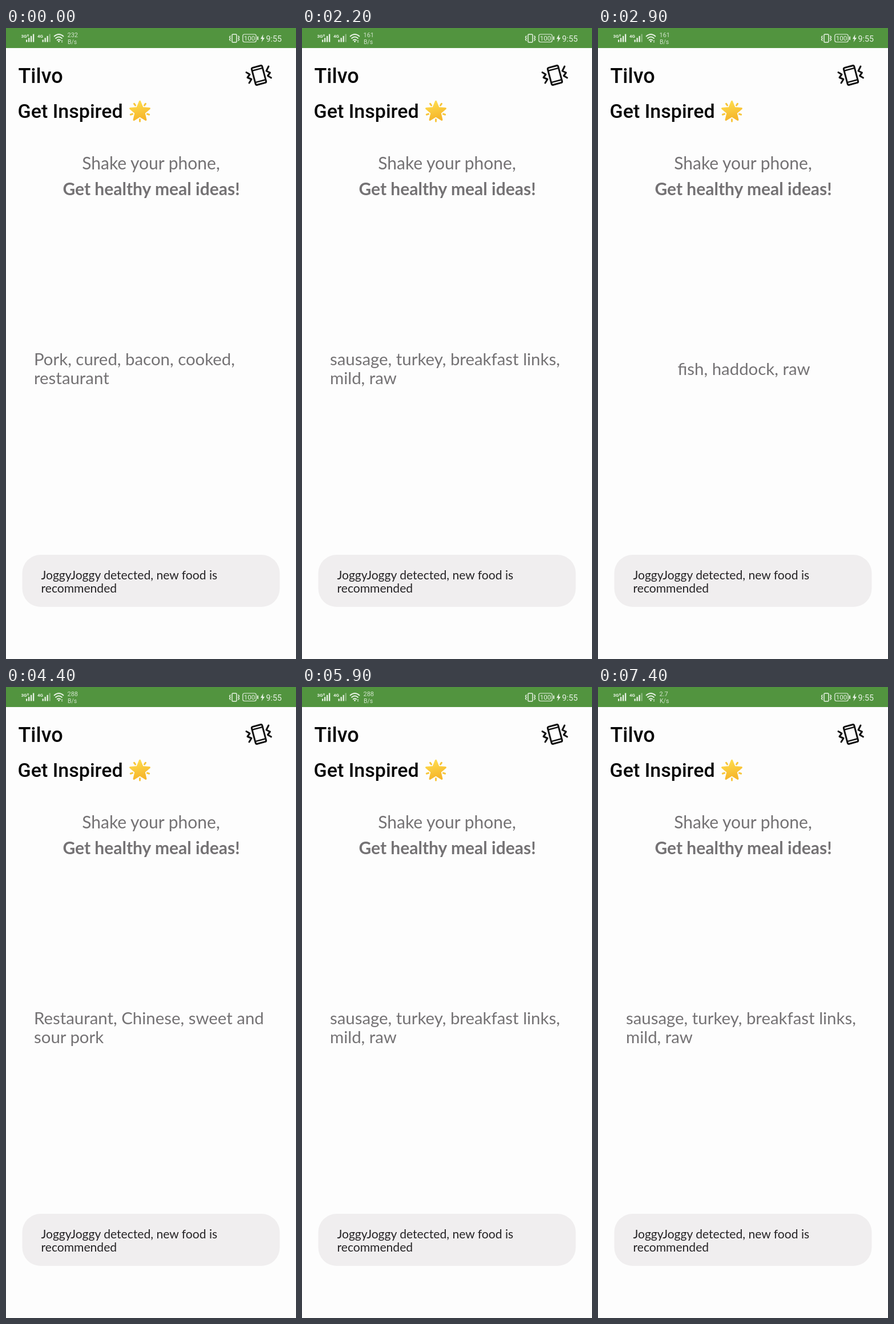
Recreate the animation shown at these times as an HTML page. Size 508 px wide and 1102 px high, loop 8000 ms.

```html
<!DOCTYPE html>
<html lang="en">
<head>
<meta charset="utf-8">
<title>Meal ideas</title>
<style>
  html, body { margin: 0; width: 100%; height: 100%; overflow: hidden; background: #fdfdfd; }
  svg { display: block; width: 100vw; height: 100vh; }
  text { font-family: Lato, sans-serif; }
  .ui text, .title { font-family: Roboto, sans-serif; }
  .title { font-weight: 500; fill: #050505; }
  .soft { font-size: 30px; fill: #747274; }
  #food { font-size: 29.4px; fill: #747274; }
  .mid { text-anchor: middle; }
  .toast { font-size: 21.1px; fill: #252325; }
  .line { fill: none; stroke-linecap: round; stroke-linejoin: round; }
</style>
</head>
<body>
<svg viewBox="0 0 508 1102">
  <defs>
    <linearGradient id="gold" x1="0" y1="0" x2="0.3" y2="1">
      <stop offset="0" stop-color="#ffe052"/>
      <stop offset="1" stop-color="#f6b72b"/>
    </linearGradient>
  </defs>
  <rect width="508" height="1102" fill="#fdfdfd"/>
  <rect width="508" height="35" fill="#52943f"/>

  <g class="ui" fill="#e8f2e5">
    <text x="26.5" y="17" font-size="8" font-weight="700">3G</text>
    <text x="37" y="14.5" font-size="5" font-weight="700">R</text>
    <text x="55" y="17" font-size="8" font-weight="700">4G</text>
    <g id="bars"></g>
    <path class="line" stroke="#e8f2e5" stroke-width="1.8"
      d="M84.5 14.5Q92.5 7.5 100.5 14.5M87 18Q92.5 13 98 18M89.7 21.3Q92.5 19 95.3 21.3"/>
    <circle cx="92.5" cy="23.5" r="1.4"/>
    <path d="M96.5 23l1.5-2 1.5 2zM96.5 24h3l-1.5 1.5z"/>
    <g opacity=".85">
      <text id="speed" x="107.5" y="16" font-size="11"></text>
      <text id="unit" x="108" y="28" font-size="10.5"></text>
    </g>

    <g class="line" stroke="#e8f2e5" stroke-width="1.5">
      <rect x="396" y="11" width="8" height="14" rx="1.5"/>
      <path d="M393 14l-1.5 2 1.5 2-1.5 2 1.5 2M407 14l1.5 2-1.5 2 1.5 2-1.5 2"/>
      <rect x="414.8" y="11" width="23.4" height="13.5" rx="3" stroke-width="1.2"/>
      <path d="M441 15.5v4.5" stroke-width="2"/>
    </g>
    <text class="mid" x="426.5" y="22" font-size="11.5">100</text>
    <path d="M450.5 11l-4.5 8h3l-1.5 6 5.5-8h-3z"/>
    <text x="455.5" y="23.5" font-size="14.2">9:55</text>
  </g>

  <text class="title" x="21.5" y="96" font-size="36">Tilvo</text>
  <text class="title" x="20.5" y="157" font-size="34">Get Inspired</text>

  <g transform="translate(234.5 146)">
    <path id="star" fill="url(#gold)" stroke="url(#gold)" stroke-width="3" stroke-linejoin="round"/>
    <path id="rays" class="line" stroke="#f7c63c" stroke-width="3"/>
  </g>

  <g class="line" stroke="#111" stroke-width="3">
    <g transform="translate(443 82.5) rotate(-15)">
      <rect x="-9.5" y="-15.5" width="19" height="31" rx="2.5"/>
      <path d="M-9.5-10.5h19M-9.5 10.5h19" stroke-width="2.5"/>
    </g>
    <path d="M421 77.5l6 3.5-4 5.5 7 3-4 6.5M464.5 87l-6-3.5 4-5.5-6.5-3 4-8"/>
  </g>

  <text class="soft mid" x="254" y="247">Shake your phone,</text>
  <text class="soft mid" x="254.5" y="292" font-weight="700">Get healthy meal ideas!</text>
  <g id="food"></g>

  <rect x="28.5" y="920" width="451" height="91" rx="32" fill="#f0eeef"/>
  <text class="toast" x="61.5" y="962.5">JoggyJoggy detected, new food is</text>
  <text class="toast" x="61.5" y="985.5">recommended</text>
</svg>

<script>
const LOOP = 8000;
const $ = id => document.getElementById(id);

// Each entry holds from its start time until the next one.
const speeds = [
  [0, '232', 'B/s'], [1400, '161', 'B/s'], [4400, '288', 'B/s'], [7400, '2.7', 'K/s']
];
const sausage = ['sausage, turkey, breakfast links,', 'mild, raw'];
const foods = [
  [0, 'Pork, cured, bacon, cooked,', 'restaurant'],
  [2200, ...sausage],
  [2700, 'fish, haddock, raw'],
  [4400, 'Restaurant, Chinese, sweet and', 'sour pork'],
  [4600, ...sausage]
];
const at = (list, t) => list.findLast(item => item[0] <= t);

function signal(x, lit) {
  return [0, 1, 2, 3].map(i => {
    const h = 4 + i * 3.3;
    return `<rect x="${x + i * 4}" y="${24.5 - h}" width="2.3" height="${h}" opacity="${i < lit ? 1 : 0.4}"/>`;
  }).join('');
}

function polar(r, deg) {
  const a = deg * Math.PI / 180;
  return `${r * Math.sin(a)} ${-r * Math.cos(a)}`;
}

function drawStatic() {
  $('bars').innerHTML = signal(35, 4) + signal(63.5, 3);
  const points = Array.from({ length: 10 }, (_, i) => polar(i % 2 ? 8 : 17.8, i * 36));
  $('star').setAttribute('d', `M${points.join('L')}Z`);
  const rays = [36, 108, 180, 252, 324].map(a => `M${polar(13.5, a)}L${polar(17, a)}`);
  $('rays').setAttribute('d', rays.join(''));
}

function showFood([, ...lines]) {
  const single = lines.length === 1;
  $('food').innerHTML = lines.map((line, i) => single
    ? `<text class="mid" x="255.5" y="605.5">${line}</text>`
    : `<text x="49" y="${588.5 + i * 33.3}">${line}</text>`).join('');
}

let shown;
const start = performance.now();
function frame() {
  const t = (performance.now() - start) % LOOP;
  const [, speed, unit] = at(speeds, t);
  $('speed').textContent = speed;
  $('unit').textContent = unit;
  const food = at(foods, t);
  if (food !== shown) showFood(shown = food);
  requestAnimationFrame(frame);
}

drawStatic();
frame();
</script>
</body>
</html>
```
